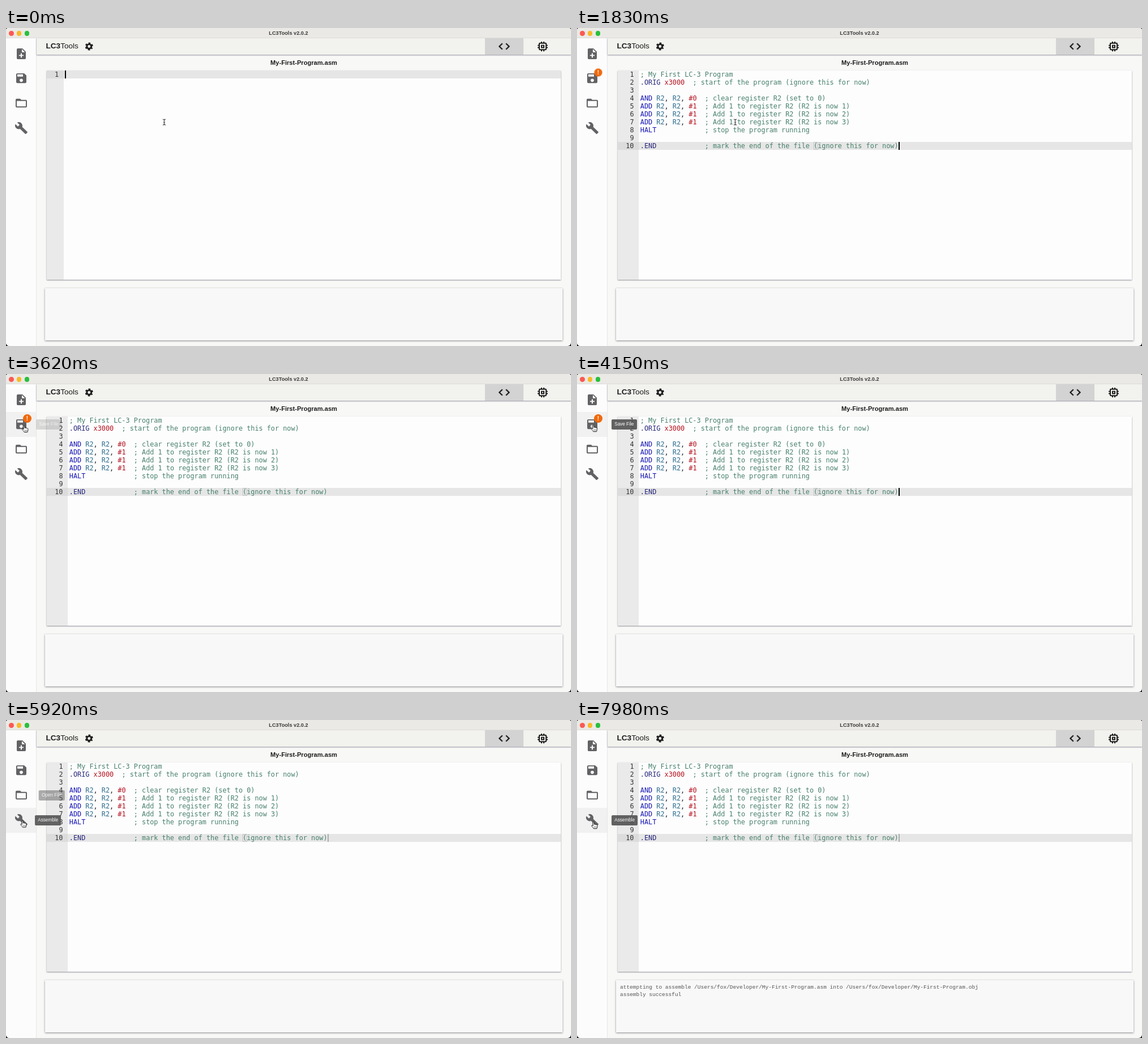
Recreate the animation shown at these times as an HTML page. Size 998 px wide and 561 px high, loop 8000 ms.

```html
<!DOCTYPE html>
<html lang="en">
<head>
<meta charset="utf-8">
<title>LC3Tools</title>
<style>
html, body { margin: 0; width: 100%; height: 100%; overflow: hidden; background: #17171b; }
body { font-family: "Liberation Sans", Arial, sans-serif; color: #1c1c1c; }
#app { position: absolute; left: 0; top: 0; width: 998px; height: 561px; overflow: hidden; background: #f8f8f7; border-radius: 4px 4px 6px 6px; }
#app div, #app svg, #app pre, #app b { position: absolute; box-sizing: border-box; }
pre { margin: 0; font: 11.83px/14px "DejaVu Sans Mono", monospace; white-space: pre; }

/* window chrome */
.title { left: 0; top: 0; width: 998px; height: 18px; background: #ebe9e5; border-bottom: 1px solid #dedcd8; text-align: center; font: bold 9.2px/18px "Liberation Sans", Arial, sans-serif; color: #3a3a3a; }
.light { top: 5px; width: 8.6px; height: 8.6px; border-radius: 50%; }
.side { left: 0; top: 18px; width: 54px; height: 543px; background: #fcfcfd; border-right: 1px solid #e6e6e8; }
.head { left: 54px; top: 18px; width: 944px; height: 29px; background: #f2f2ee; box-shadow: 0 1px 2px rgba(40,40,70,.5); }
.tab { left: 846px; top: 18px; width: 68px; height: 29px; background: #d3d3d3; }
.brand { left: 70.5px; top: 23px; font-size: 13.6px; line-height: 18px; white-space: pre; }
#app .brand b { position: static; }
#app .file { left: 72px; top: 54px; width: 908px; text-align: center; font-size: 11.12px; line-height: 15px; }
.icon { fill: #626265; }
.dark { fill: #1c1c1c; }

/* panels */
.editor { left: 72px; top: 75px; width: 908px; height: 369px; background: #fdfdfe; box-shadow: 0 1px 2px rgba(40,40,60,.5); overflow: hidden; }
.view { left: 0; top: 0; width: 908px; height: 369px; }
.gutter { left: 0; top: 0; height: 369px; background: #eaeaea; }
.row { left: 0; width: 908px; height: 14px; background: #e6e6e6; }
.cell { left: 0; height: 14px; background: #dcdcdc; }
.nums { top: 0; left: 0; text-align: right; color: #333; }
.caret { width: 2px; height: 14px; background: #000; }
.match { left: 346px; top: 126px; width: 8px; height: 14px; border: 1px solid #c2c2c2; }
.console { left: 69px; top: 459px; width: 914px; height: 92px; background: #f8f8f9; box-shadow: 0 1px 3px rgba(40,40,50,.55); }
.console pre { left: 7px; top: 6px; font: 9.5px/13px "Liberation Mono", "Courier New", monospace; color: #555; }
.c { color: #47806a; } .k { color: #1616b4; } .d { color: #26267c; }
.r { color: #2a6a8c; } .n { color: #b4121e; }

/* side bar feedback */
.hover { left: 0; width: 53px; height: 44px; background: #f1f1f1; }
.badge { left: 30px; top: 71px; width: 15px; height: 15px; border-radius: 50%; background: #f0690c; color: #fff; text-align: center; font: bold 10px/15px "Liberation Sans", Arial, sans-serif; }
.tip { left: 61px; height: 18px; padding: 0 5.2px; border-radius: 2px; background: #555; color: #fff; font-size: 8.2px; line-height: 18px; white-space: pre; }
#mouse { left: 0; top: 0; width: 0; height: 0; }
#mouse svg { overflow: visible; width: 1px; height: 1px; left: 0; top: 0; }

/* timeline: 1% = 80ms */
.step { animation: 8s step-end infinite; }
.flow { animation: 8s linear infinite; }
.before { animation-name: before; }
.after { animation-name: after; }
.blink1 { animation-name: blink1; }
.blink2 { animation-name: blink2; }
.badge { animation-name: badge; }
.log { animation-name: log; }
.h1 { animation-name: h1; } .h2 { animation-name: h2; } .h3 { animation-name: h3; }
.t1 { animation-name: t1; } .t2 { animation-name: t2; } .t3 { animation-name: t3; }
.beam { animation-name: beam; } .arrow { animation-name: arrow; } .hand { animation-name: hand; }
#mouse { animation-name: path; }
@keyframes before { 0% { opacity: 1 } 21%, 100% { opacity: 0 } }
@keyframes after { 0% { opacity: 0 } 21%, 100% { opacity: 1 } }
@keyframes blink1 { 0%, 8.375% { opacity: 1 } 3.375%, 16.25%, 100% { opacity: 0 } }
@keyframes blink2 { 0%, 21%, 33.5%, 46% { opacity: 1 } 28.5%, 41% { opacity: 0 } 53.5%, 100% { opacity: .25 } }
@keyframes badge { 0%, 21% { transform: scale(0) } 23%, 55.3% { transform: scale(1) } 57%, 100% { transform: scale(0) } }
@keyframes log { 0% { opacity: 0 } 84.9%, 100% { opacity: 1 } }
@keyframes h1 { 0%, 66.4%, 100% { opacity: 0 } 44% { opacity: 1 } }
@keyframes h2 { 0%, 72.3%, 100% { opacity: 0 } 66.4% { opacity: 1 } }
@keyframes h3 { 0% { opacity: 0 } 72.3%, 100% { opacity: 1 } }
@keyframes t1 {
  0%, 44.5% { opacity: 0; transform: translateX(-10px) }
  48%, 67.4% { opacity: .92; transform: none }
  71%, 100% { opacity: 0; transform: translateX(-10px) }
}
@keyframes t2 {
  0%, 67.5% { opacity: 0; transform: translateX(-10px) }
  71%, 72.8% { opacity: .92; transform: none }
  74% { opacity: .48; transform: translateX(-3.2px) }
  76.2%, 100% { opacity: 0; transform: translateX(-10px) }
}
@keyframes t3 {
  0%, 73% { opacity: 0; transform: translateX(-10px) }
  74% { opacity: .92; transform: translateX(-10px); animation-timing-function: ease-out }
  77.6%, 100% { opacity: .92; transform: none }
}
@keyframes beam { 0% { opacity: 1 } 42.5%, 100% { opacity: 0 } }
@keyframes arrow { 0%, 44%, 100% { opacity: 0 } 42.5% { opacity: 1 } }
@keyframes hand { 0% { opacity: 0 } 44%, 100% { opacity: 1 } }
@keyframes path {
  0%, 37% { transform: translate(279.5px, 166px); animation-timing-function: ease-in-out }
  46%, 65% { transform: translate(28.5px, 90px) }
  67.25%, 70.5% { transform: translate(32.5px, 124.5px) }
  74% { transform: translate(29px, 177.5px); animation-timing-function: ease-out }
  76.5%, 100% { transform: translate(29px, 180px) }
}
</style>
</head>
<body>
<div id="app">
  <div class="side"></div>
  <div class="head"></div>
  <div class="title">LC3Tools v2.0.2</div>
  <div class="light" style="left:5px;background:#fb5a52"></div>
  <div class="light" style="left:18.7px;background:#f8b928"></div>
  <div class="light" style="left:32.5px;background:#28c03c"></div>
  <div class="tab"></div>
  <div class="brand"><b>LC3</b>Tools</div>
  <b class="file">My-First-Program.asm</b>

  <svg class="dark" style="left:137.5px;top:24px" width="17.5" height="17" viewBox="0 0 24 24" preserveAspectRatio="none">
    <g fill="none" stroke="#1c1c1c"><circle cx="12" cy="12" r="5.4" stroke-width="4"/><circle cx="12" cy="12" r="8.2" stroke-width="3" stroke-dasharray="4.7 3.887" stroke-dashoffset="2.35" transform="rotate(30 12 12)"/></g>
  </svg>
  <svg class="dark" style="left:867.5px;top:20.5px" width="24" height="23" viewBox="0 0 24 24" preserveAspectRatio="none"><path d="M9.4 16.6L4.8 12l4.6-4.6L8 6l-6 6 6 6 1.4-1.4zm5.2 0l4.6-4.6-4.6-4.6L16 6l6 6-6 6-1.4-1.4z" stroke="#1c1c1c" stroke-width=".4"/></svg>
  <svg class="dark" style="left:936px;top:21px" width="24" height="23" viewBox="0 0 24 24" preserveAspectRatio="none"><path d="M15 9H9v6h6V9zm-2 4h-2v-2h2v2zm8-2V9h-2V7c0-1.1-.9-2-2-2h-2V3h-2v2h-2V3H9v2H7c-1.1 0-2 .9-2 2v2H3v2h2v2H3v2h2v2c0 1.1.9 2 2 2h2v2h2v-2h2v2h2v-2h2c1.1 0 2-.9 2-2v-2h2v-2h-2v-2h2zm-4 6H7V7h10v10z"/></svg>

  <div class="hover step h1" style="top:66.5px"></div>
  <div class="hover step h2" style="top:110.5px"></div>
  <div class="hover step h3" style="top:154.5px"></div>

  <svg class="icon" style="left:15px;top:33.5px" width="24" height="23" viewBox="0 0 24 24" preserveAspectRatio="none"><path d="M14 2H6c-1.1 0-2 .9-2 2v16c0 1.1.9 2 2 2h12c1.1 0 2-.9 2-2V8l-6-6zm2 14h-3v3h-2v-3H8v-2h3v-3h2v3h3v2zm-3-7V3.5L18.5 9H13z"/></svg>
  <svg class="icon" style="left:15px;top:76.5px" width="24" height="23" viewBox="0 0 24 24" preserveAspectRatio="none"><path d="M17 3H5c-1.1 0-2 .9-2 2v14c0 1.1.9 2 2 2h14c1.1 0 2-.9 2-2V7l-4-4zm-5 16c-1.66 0-3-1.34-3-3s1.34-3 3-3 3 1.34 3 3-1.34 3-3 3zm3-10H5V5h10v4z"/></svg>
  <svg class="icon" style="left:15px;top:120.5px" width="24" height="23" viewBox="0 0 24 24" preserveAspectRatio="none"><path d="M20 6h-8l-2-2H4c-1.1 0-2 .9-2 2v12c0 1.1.9 2 2 2h16c1.1 0 2-.9 2-2V8c0-1.1-.9-2-2-2zm0 12H4V8h16v10z"/></svg>
  <svg class="icon" style="left:15px;top:165px" width="24" height="23" viewBox="0 0 24 24" preserveAspectRatio="none"><path d="M22.7 19l-9.1-9.1c.9-2.3.4-5-1.5-6.9-2-2-5-2.4-7.4-1.3L9 6 6 9 1.6 4.7C.4 7.1.9 10.1 2.9 12.1c1.9 1.9 4.6 2.4 6.9 1.5l9.1 9.1c.4.4 1 .4 1.4 0l2.3-2.3c.5-.4.5-1.1.1-1.4z"/></svg>
  <div class="badge flow">!</div>

  <div class="editor">
    <div class="view step before">
      <div class="row" style="top:0"></div>
      <div class="gutter" style="width:30px"></div>
      <div class="cell" style="top:0;width:30px"></div>
      <pre class="nums" style="width:21px">1</pre>
      <div class="caret step blink1" style="left:32px;top:0"></div>
    </div>
    <div class="view step after">
      <div class="row" style="top:126px"></div>
      <div class="gutter" style="width:37px"></div>
      <div class="cell" style="top:126px;width:37px"></div>
      <pre class="nums" style="width:28.5px">1
2
3
4
5
6
7
8
9
10</pre>
      <div class="match"></div>
      <pre style="left:39.8px;top:0"><span class="c">; My First LC-3 Program</span>
<span class="d">.ORIG</span> <span class="n">x3000</span>  <span class="c">; start of the program (ignore this for now)</span>

<span class="k">AND</span> <span class="r">R2</span>, <span class="r">R2</span>, <span class="n">#0</span>  <span class="c">; clear register R2 (set to 0)</span>
<span class="k">ADD</span> <span class="r">R2</span>, <span class="r">R2</span>, <span class="n">#1</span>  <span class="c">; Add 1 to register R2 (R2 is now 1)</span>
<span class="k">ADD</span> <span class="r">R2</span>, <span class="r">R2</span>, <span class="n">#1</span>  <span class="c">; Add 1 to register R2 (R2 is now 2)</span>
<span class="k">ADD</span> <span class="r">R2</span>, <span class="r">R2</span>, <span class="n">#1</span>  <span class="c">; Add 1 to register R2 (R2 is now 3)</span>
<span class="k">HALT</span>            <span class="c">; stop the program running</span>

<span class="d">.END</span>            <span class="c">; mark the end of the file (ignore this for now)</span></pre>
      <div class="caret step blink2" style="left:496px;top:126px"></div>
    </div>
  </div>

  <div class="console"><pre class="step log">attempting to assemble /Users/fox/Developer/My-First-Program.asm into /Users/fox/Developer/My-First-Program.obj
assembly successful</pre></div>

  <div class="tip flow t1" style="top:79.5px">Save File</div>
  <div class="tip flow t2" style="top:123.5px">Open File</div>
  <div class="tip flow t3" style="top:167.5px">Assemble</div>

  <div id="mouse" class="flow">
    <svg class="step beam"><path d="M-2.5-5Q0-5 0-3.5Q0-5 2.5-5M0-3.5V3.5M-2.5 5Q0 5 0 3.5Q0 5 2.5 5M-1.2 .8H1.2" fill="none" stroke="#222" stroke-width="1.1"/></svg>
    <svg class="step arrow"><path d="M0 0V11L2.6 8.7 4.3 12.4 6 11.6 4.4 8H7.8Z" fill="#111" stroke="#fff" stroke-width=".8"/></svg>
    <svg class="step hand"><path d="M-1.3.8C-1.3-.7.8-.7.9.8L1.2 4.2C1.8 3.5 3 3.7 3.2 4.5C3.9 3.9 5 4.2 5.2 5C6.2 4.6 7.2 5.1 7.1 6.3C7.1 8.6 6.4 9.4 6 11.6H.3C-.3 9.9-1.9 8.6-3 7.2C-3.8 6-2.3 5.2-1.3 6.2L-.7 6.8Z" fill="#fff" stroke="#111" stroke-width="1" stroke-linejoin="round"/><path d="M1.5 7.6V10M3.1 7.6V10M4.7 7.6V10" stroke="#333" stroke-width=".6"/></svg>
  </div>
</div>
</body>
</html>
```
